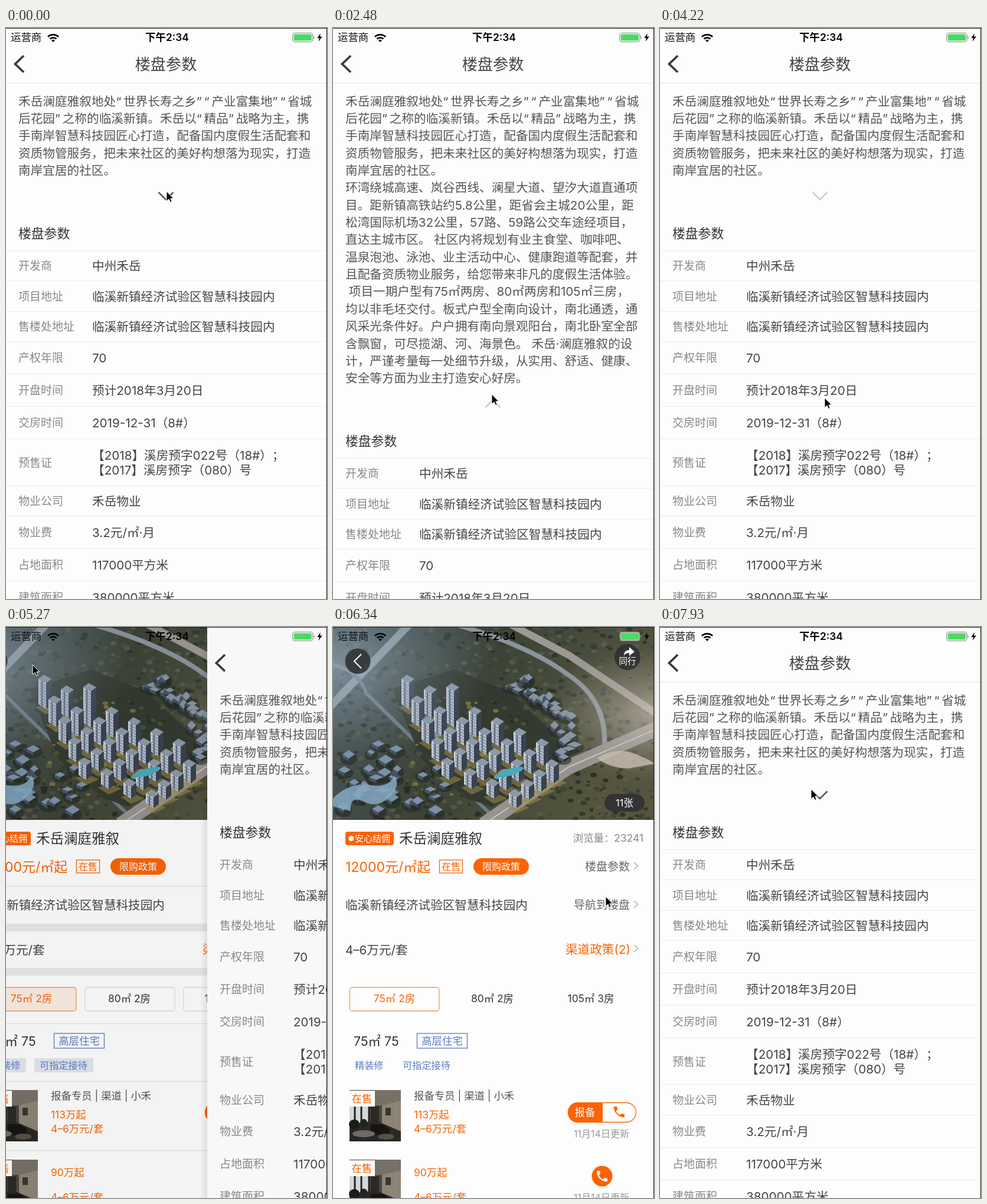
These frames come from a looping animation (544x968 px, 8 s). An HTML page:

```html
<!DOCTYPE html>
<html lang="zh-CN">
<head>
<meta charset="utf-8">
<title>楼盘参数</title>
<style>
html, body { margin: 0; width: 100%; height: 100%; overflow: hidden; background: #fdfdfd; }
svg { display: block; width: 100vw; height: 100vh; }
text {
  font-family: Inter, "Noto Sans CJK SC", "Noto Sans CJK", sans-serif; font-weight: 400;
  white-space: pre; text-spacing-trim: space-all;
}
.quote { letter-spacing: .18em; }
</style>
</head>
<body>
<svg id="stage" viewBox="0 0 544 968"></svg>
<script>
const W = 544, H = 968, LOOP = 8000;
const ORANGE = '#fb6304', BLUE = '#5b7cc4';
const PROJECT = '禾岳澜庭雅叙', ADDRESS = '临溪新镇经济试验区智慧科技园内';

// Markup helpers; text is placed by its vertical centre.
const text = (x, mid, size, fill, str, extra = '') =>
  `<text x="${x}" y="${mid + size * 0.37}" font-size="${size}" fill="${fill}" ${extra}>${
    str.replace(/[“”]+/g, '<tspan class="quote">$&</tspan>')}</text>`;
const centred = (x, mid, size, fill, str) => text(x, mid, size, fill, str, 'text-anchor="middle"');
const rightText = (x, mid, size, fill, str) => text(x, mid, size, fill, str, 'text-anchor="end"');
const rect = (x, y, w, h, fill, extra = '') =>
  `<rect x="${x}" y="${y}" width="${w}" height="${h}" fill="${fill}" ${extra}/>`;
const outline = (x, y, w, h, color, r = 0) => rect(x, y, w, h, 'none', `stroke="${color}" stroke-width="1.3" rx="${r}"`);
const disc = (x, y, r, fill, extra = '') => `<circle cx="${x}" cy="${y}" r="${r}" fill="${fill}" ${extra}/>`;
const oval = (x, y, rx, ry, fill, extra = '') =>
  `<ellipse cx="${x.toFixed(1)}" cy="${y.toFixed(1)}" rx="${rx.toFixed(1)}" ry="${ry.toFixed(1)}" fill="${fill}" ${extra}/>`;
const line = (d, color, width, extra = '') =>
  `<path d="${d}" fill="none" stroke="${color}" stroke-width="${width}" ${extra}/>`;
const shape = (d, fill, extra = '') => `<path d="${d}" fill="${fill}" ${extra}/>`;
const rule = (y, color) => rect(0, y, W, 1, color);

let seed = 7;
const random = () => (seed = (seed * 16807) % 2147483647) / 2147483647;
const between = (a, b) => a + (b - a) * random();

// ---------- parameters page ----------
const intro = [
  `${PROJECT}地处“世界长寿之乡”“产业富集地”“省城`,
  '后花园”之称的临溪新镇。禾岳以“精品”战略为主，携',
  '手南岸智慧科技园匠心打造，配备国内度假生活配套和',
  '资质物管服务，把未来社区的美好构想落为现实，打造',
  '南岸宜居的社区。',
  '环湾绕城高速、岚谷西线、澜星大道、望汐大道直通项',
  '目。距新镇高铁站约5.8公里，距省会主城20公里，距',
  '松湾国际机场32公里，57路、59路公交车途经项目，',
  '直达主城市区。 社区内将规划有业主食堂、咖啡吧、',
  '温泉泡池、泳池、业主活动中心、健康跑道等配套，并',
  '且配备资质物业服务，给您带来非凡的度假生活体验。',
  ' 项目一期户型有75㎡两房、80㎡两房和105㎡三房，',
  '均以非毛坯交付。板式户型全南向设计，南北通透，通',
  '风采光条件好。户户拥有南向景观阳台，南北卧室全部',
  '含飘窗，可尽揽湖、河、海景色。 禾岳·澜庭雅叙的设',
  '计，严谨考量每一处细节升级，从实用、舒适、健康、',
  '安全等方面为业主打造安心好房。'
];
const table = [
  [377, 403, '开发商', '中州禾岳'],
  [428, 455, '项目地址', ADDRESS],
  [480, 506, '售楼处地址', ADDRESS],
  [531, 559, '产权年限', '70'],
  [586, 614, '开盘时间', '预计2018年3月20日'],
  [641, 669, '交房时间', '2019-12-31（8#）'],
  [696, 737, '预售证', '【2018】溪房预字022号（18#）；', '【2017】溪房预字（080）号'],
  [775, 802, '物业公司', '禾岳物业'],
  [827, 855, '物业费', '3.2元/㎡·月'],
  [882, 910, '占地面积', '117000平方米'],
  [937, 965, '建筑面积', '380000平方米']
];

const introLines = (from, to) => intro.slice(from, to)
  .map((s, i) => text(21, 124 + 29.35 * (from + i), 20.65, '#555', s)).join('');

function paramsPage() {
  const rows = table.map(([, mid, label, ...values]) =>
    text(21, mid, 19, '#888', label) +
    values.map((v, i) => text(146, mid + (values.length > 1 ? i * 25 - 12.5 : 0), 20.65, '#444', v)).join('')).join('');
  return rect(0, 0, W, H, '#fdfdfd', 'id="paper"') +
    line('M30 47L15.5 61L30 75', '#3a3a3a', 3.8, 'id="back"') +
    centred(271, 61, 26.2, '#444', '楼盘参数') +
    `<g class="rest">${rule(93, '#e4e4e4')}</g>` +
    introLines(0, 5) + `<g id="more">${introLines(5)}</g>` +
    `<g id="lower">${line('', '#585858', 2.5, 'id="toggle"')}` +
    text(21, 348, 21.8, '#333', '楼盘参数') +
    `<g class="rest">${table.map(r => rule(r[0], '#ececec')).join('')}</g>${rows}</g>`;
}

// ---------- project page ----------
function tower(x, y, h) {
  let s = shape(`M${x - 16} ${y + h + 4}l20 -6l20 8l-22 10z`, '#a08a4c', 'opacity=".55"') +
    shape(`M${x - 11} ${y}l13 7v${h}l-13 -8z`, '#b4bfcc') +
    shape(`M${x + 2} ${y + 7}l9 -7v${h}l-9 7z`, '#39424f') +
    shape(`M${x - 11} ${y}l9 -7l13 7l-9 7z`, '#8d99a8');
  for (let k = 5; k < h; k += 5) s += line(`M${x - 11} ${y + k}l13 7`, '#75849a', 1.3);
  return s + line(`M${x - 5} ${y + 4}v${h - 1}`, '#5c6878', 2.2) + line(`M${x - 10} ${y}v${h - 1}`, '#dfe4e8', 1.4);
}

function house(x, y, color) {
  const w = between(7, 13), d = between(4, 8);
  return oval(x + w, y + d, w + 4, d + 4, '#242a26', 'opacity=".6"') +
    shape(`M${x} ${y}l${w} ${-d}l${w} ${d}l${-w} ${d}z`, color) +
    shape(`M${x} ${y}v5l${w} ${d}v-5z`, '#465465');
}

function foliage(count, x0, y0, x1, y1, colors) {
  let s = '';
  for (let i = 0; i < count; i++) {
    const r = between(2, 6);
    s += oval(between(x0, x1), between(y0, y1), r, r * 0.7, colors[i % colors.length], 'opacity=".75"');
  }
  return s;
}

function aerialView() {
  let s = rect(0, 0, W, 327, 'url(#land)') +
    foliage(520, 0, 0, W, 170, ['#343c35', '#465045', '#596256', '#2a312b', '#4b5348']) +
    foliage(460, 0, 160, W, 327, ['#2c3226', '#454a35', '#5d6046', '#23281f', '#3a4031']);
  s += line('M-5 135L130 -5', '#8f9aa2', 13) + line('M-5 62Q45 75 56 112L105 160L280 330', '#6c7a86', 6) +
    line('M205 -5Q330 30 400 82Q465 125 460 205', '#8a949b', 8) +
    line('M300 -5L400 48L550 148', '#9c9893', 12) +
    line('M255 335L400 237L550 172', '#96938f', 25) + line('M255 335L400 237L550 172', '#c9c5be', 2) +
    shape('M100 105L205 72L300 110L400 205L380 230L270 305L225 290L150 225z', '#343a30') +
    foliage(150, 125, 120, 345, 285, ['#262d22', '#4d5a38', '#8d7b42', '#333b2e']);
  for (let i = 0; i < 30; i++) s += house(between(5, 180), between(195, 310), '#7b90a8');
  for (let i = 0; i < 26; i++) {
    const a = -1.5 + 1.8 * i / 25, r = between(82, 118);
    s += house(285 + r * Math.cos(a), 190 + r * Math.sin(a), '#8493a6');
  }
  s += shape('M0 290Q30 262 62 268T104 252Q116 268 96 288T52 296T30 312L0 304z', '#86aac5', 'opacity=".85"');
  for (const [x, y] of [[235, 182], [292, 250], [178, 180]])
    s += oval(x, y, 20, 6, '#4aa9ba', `transform="rotate(-15 ${x} ${y})"`);
  for (let j = 0; j < 5; j++)
    for (let i = 0; i < 7 && i + j < 8; i++) {
      const tall = i === 2 && j === 0 ? 22 : 0;
      s += tower(127 + 38 * i + 17 * j, 88 + 18 * i + 35 * j - tall, 44 - 5 * j - 2 * i + tall);
    }
  s += oval(300, 246, 24, 6, '#4aa9ba', 'transform="rotate(-18 300 246)"');
  return s + shape('M448 222Q480 202 512 215T544 232L500 240Q465 238 448 222z', '#cfc2b5', 'opacity=".8"') +
    rect(0, 0, W, 327, 'url(#hazeLeft)') + rect(0, 0, W, 327, 'url(#hazeRight)');
}

const phone = (x, y, fill) => shape(
  'M6.6 10.8c1.4 2.8 3.8 5.1 6.6 6.6l2.2-2.2c.3-.3.7-.4 1-.2 1.1.4 2.3.6 3.6.6.6 0 1 .4 1 1V20c0 .6-.4 1-1 1C10.6 21 3 13.4 3 4c0-.6.4-1 1-1h3.5c.6 0 1 .4 1 1 0 1.3.2 2.5.6 3.6.1.4 0 .8-.2 1z',
  fill, `transform="translate(${x - 12} ${y - 12})"`);
const arrow = y => line(`M510 ${y - 6}l6.5 6l-6.5 6`, '#aaa', 1.4);

function listing(y, price) {
  return `<g transform="translate(28 ${y})">` + rect(0, 0, 87, 87, '#4a4640') +
    shape('M43 0H87V20L60 26H43z', '#777067') + shape('M55 26L87 18V72L55 62z', '#8c8475') +
    rect(0, 28, 34, 30, '#d3d8da') + line('M9 28v32M20 28v32M33 28v32', '#25231f', 3) +
    shape('M36 28h14v32h-14z', '#2c2925') + rect(61, 30, 9, 13, '#3b352f') +
    shape('M0 58L45 52L87 70V87H0z', '#2a2724') + oval(8, 58, 9, 8, '#1b1d18') + oval(24, 55, 6, 6, '#22251e') +
    shape('M36 58h20l12 8v10h-32z', '#161514') + oval(24, 74, 19, 6, '#6f6b65') + oval(62, 79, 14, 5, '#56504a') +
    rect(0, 1, 43, 27, '#fdfdfd') + '</g>' +
    centred(49, y + 15, 17.4, ORANGE, '在售') + text(137, price[0], 17.4, ORANGE, price[1]) +
    text(137, price[2], 17.4, ORANGE, '4–6万元/套');
}

function projectPage() {
  const dividers = [439, 672, 770, 887].map(y => rule(y, '#dedede')).join('') +
    rect(0, 503, W, 13, '#e9e9e9') + rect(0, 578, W, 13, '#e9e9e9') +
    outline(195, 611, 152, 40, '#ddd', 4) + outline(362, 611, 152, 40, '#ddd', 4) +
    rect(28, 611, 152, 40, '#fbece2', 'rx="4"') + rect(28, 731, 67, 24, '#e3e6ec') + rect(109, 731, 100, 24, '#e3e6ec');
  const priceRow = text(21, 406, 23, ORANGE, '12000元/㎡起') + outline(180.5, 395, 39, 22, ORANGE) +
    centred(200, 406, 16, ORANGE, '在售') + rect(238, 392, 94, 28, ORANGE, 'rx="14"') +
    centred(285, 406, 16, '#fff', '限购政策') + rightText(503, 406, 19, '#666', '楼盘参数') + arrow(405);
  return rect(0, 0, W, H, '#fdfdfd') + `<g clip-path="url(#photo)">${aerialView()}</g>` +
    disc(42, 58, 21.5, '#2e3031', 'opacity=".85"') + line('M48 46L36 58L48 70', '#fff', 2) +
    disc(499, 51, 22, '#2e3031', 'opacity=".85"') +
    shape('M493 49Q493 39 502 39V34L511 42L502 49V44Q495 44 493 49z', '#fff') + centred(499, 58, 14.5, '#fff', '同行') +
    rect(460, 283, 68, 30, '#333', 'rx="15"') + centred(494, 298, 16.5, '#fff', '11张') +
    `<g class="moving">${dividers}</g>` + rect(0, 375, W, 64, '#e5e5e5', 'id="pressed"') +
    rect(21, 347, 82, 23, ORANGE, 'rx="4"') + disc(31, 358.5, 4.5, '#fff') + text(37, 358.5, 15, '#fff', '安心结佣') +
    text(112, 358, 23.5, '#333', PROJECT) + rightText(526, 358, 17.4, '#888', '浏览量：23241') +
    `<g id="priceRow">${priceRow}</g>` +
    text(21, 471, 20.6, '#444', ADDRESS) + rightText(503, 471, 19, '#666', '导航到楼盘') + arrow(470) +
    text(21, 547, 20.6, '#444', '4–6万元/套') + rightText(504, 546, 20.6, ORANGE, '渠道政策(2)') + arrow(545) +
    outline(28.5, 611, 151.5, 40, '#f59a60', 4) +
    centred(104, 630, 17.4, ORANGE, '75㎡ 2房') + centred(270, 630, 17.4, '#333', '80㎡ 2房') +
    centred(437, 630, 17.4, '#333', '105㎡ 3房') +
    text(35, 702, 21.4, '#333', '75㎡ 75') + outline(142.5, 689, 85, 25, BLUE) + centred(185, 702, 17.4, BLUE, '高层住宅') +
    text(37, 743, 16.2, BLUE, '精装修') + text(118, 743, 16.2, BLUE, '可指定接待') +
    listing(785, [827, '113万起', 851]) + text(137, 795, 17.4, '#555', '报备专员 | 渠道 | 小禾') +
    shape('M457 806H415a17 17 0 0 0 0 34H457z', ORANGE) + outline(398.5, 806.5, 115, 33, ORANGE, 16.5) +
    centred(427, 823, 17.4, '#fff', '报备') + phone(485, 822, ORANGE) + centred(455, 859, 16, '#999', '11月14日更新') +
    listing(903, [925, '90万起', 967]) + disc(456, 931, 17.5, ORANGE) + phone(456, 931, '#fff') +
    centred(455, 967, 16, '#999', '11月14日更新');
}

function statusBar() {
  return text(8, 16, 17.4, '#111', '运营商') +
    line('M71 15A13 13 0 0 1 89 15M74.5 18.5A8 8 0 0 1 85.5 18.5', '#000', 2.8) +
    shape('M77 21Q80 18.5 83 21L80 24z', '#000') +
    text(273, 16, 17.4, '#000', '下午2:34', 'text-anchor="middle" style="font-weight:600"') +
    rect(486, 8.5, 34, 15, '#fff', 'rx="4" fill-opacity=".6" stroke="#888" stroke-width="1.2"') +
    rect(488, 10.5, 30, 11, '#4cd964', 'rx="2"') + shape('M521.5 13.5q3 2.5 0 5z', '#888') +
    shape('M533 9L527.5 17H531L529.5 23L536 14.5H532z', '#000');
}

const stage = document.getElementById('stage');
stage.innerHTML = `<defs>
  <clipPath id="photo"><path d="M0 0H${W}V327H0z"/></clipPath>
  <linearGradient id="land" x2="1" y2=".3"><stop stop-color="#4c5a64"/><stop offset=".5" stop-color="#3c4336"/><stop offset="1" stop-color="#55553f"/></linearGradient>
  <radialGradient id="hazeLeft" cx="0" cy=".2" r=".5"><stop stop-color="#a3b8c8" stop-opacity=".6"/><stop offset="1" stop-color="#8296a6" stop-opacity="0"/></radialGradient>
  <radialGradient id="hazeRight" cx="1" cy=".45" r=".35"><stop stop-color="#d6cbc1" stop-opacity=".65"/><stop offset="1" stop-color="#a8a298" stop-opacity="0"/></radialGradient>
  <linearGradient id="edge"><stop stop-opacity="0"/><stop offset="1" stop-opacity=".08"/></linearGradient>
</defs>
<g id="project">${projectPage()}</g>${rect(0, 0, W, H, '#000', 'id="dim"')}
<g id="params">${rect(-12, 0, 12, H, 'url(#edge)', 'class="moving"')}${paramsPage()}</g>
${statusBar()}${rect(0, 0, W, 1, '#222')}${rect(543, 0, 1, H, '#222')}
${shape('M0 0V16.5L4 13L6.6 18.5L9.2 17.3L6.8 12H11.8z', '#000', 'id="cursor" stroke="#fff" stroke-width="1"')}`;

const TICK = 87.8, FIRST_TICK = 525;
const presses = [0, 22, 32, 41];
const cursorPath = [
  [7, 272, 277], [17, 269, 621], [25, 269, 621], [31, 272, 277], [35, 272, 277], [39, 279, 627], [42, 279, 627],
  [44, 138, 321], [45, 138, 321], [49, 45, 64], [58, 45, 64], [62, 467, 424], [63, 467, 424], [66, 462, 457],
  [68, 456, 462], [69, 456, 462], [71, 457, 420], [77, 457, 420], [78, 460, 405], [84, 256, 275]
];

function cursorAt(n) {
  const i = cursorPath.findIndex(p => p[0] >= n);
  if (i < 0) return cursorPath.at(-1).slice(1);
  if (i === 0) return cursorPath[0].slice(1);
  const [t0, x0, y0] = cursorPath[i - 1], [t1, x1, y1] = cursorPath[i];
  const f = (n - t0) / (t1 - t0);
  return [x0 + (x1 - x0) * f, y0 + (y1 - y0) * f];
}

const spring = k => 1 - (1 + k) * Math.exp(-k);
function pageOffset(n) {
  let p = 0;
  if (n >= 78) p = 1 - spring(0.915 + 1.58 * (n - 78));
  else if (n >= 53) p = spring(2.125 + 1.58 * (n - 54));
  return p < 0.002 ? 0 : p > 0.998 ? W : Math.round(W * p);
}

const el = id => document.getElementById(id);
const show = (node, on) => { node.style.display = on ? '' : 'none'; };
const [project, dim, params, paper, back, more, lower, toggle, pressed, priceRow, cursor] =
  ['project', 'dim', 'params', 'paper', 'back', 'more', 'lower', 'toggle', 'pressed', 'priceRow', 'cursor'].map(el);
const resting = document.querySelectorAll('.rest'), moving = document.querySelectorAll('.moving');
const move = (node, x, y) => node.setAttribute('transform', `translate(${x} ${y})`);

function render(t) {
  const n = Math.floor((t - FIRST_TICK) / TICK);
  const x = pageOffset(n), sliding = x > 0 && x < W;

  const expanded = (n >= 1 && n < 23) || (n >= 33 && n < 42);
  const sincePress = n - Math.max(-99, ...presses.filter(p => p <= n));
  toggle.setAttribute('d', expanded ? 'M258.5 643L271 630.5L283.5 643' : 'M258.5 278.5L271 291L283.5 278.5');
  toggle.setAttribute('transform', expanded ? 'translate(0 -352)' : '');
  toggle.setAttribute('opacity', sincePress < 2 ? 0.3 : sincePress === 2 ? 0.65 : 1);
  show(more, expanded);
  move(lower, 0, expanded ? 352 : 0);
  back.setAttribute('opacity', n === 50 ? 0.3 : 1);

  move(params, x, 0);
  move(project, Math.round(-0.3 * (W - x)), 0);
  show(params, x < W);
  show(project, x > 0);
  show(dim, sliding);
  dim.setAttribute('opacity', 0.1 * (1 - x / W));
  paper.setAttribute('fill', sliding ? '#f8f8f8' : '#fdfdfd');
  resting.forEach(g => show(g, !sliding));
  moving.forEach(g => show(g, sliding));

  show(pressed, n >= 78);
  priceRow.setAttribute('opacity', n < 74 ? 1 : Math.max(0.28, 0.76 - 0.24 * (n - 74)));
  move(cursor, ...cursorAt(n));
}

const start = performance.now();
function frame() {
  render((performance.now() - start) % LOOP);
  requestAnimationFrame(frame);
}
frame();
</script>
</body>
</html>
```
